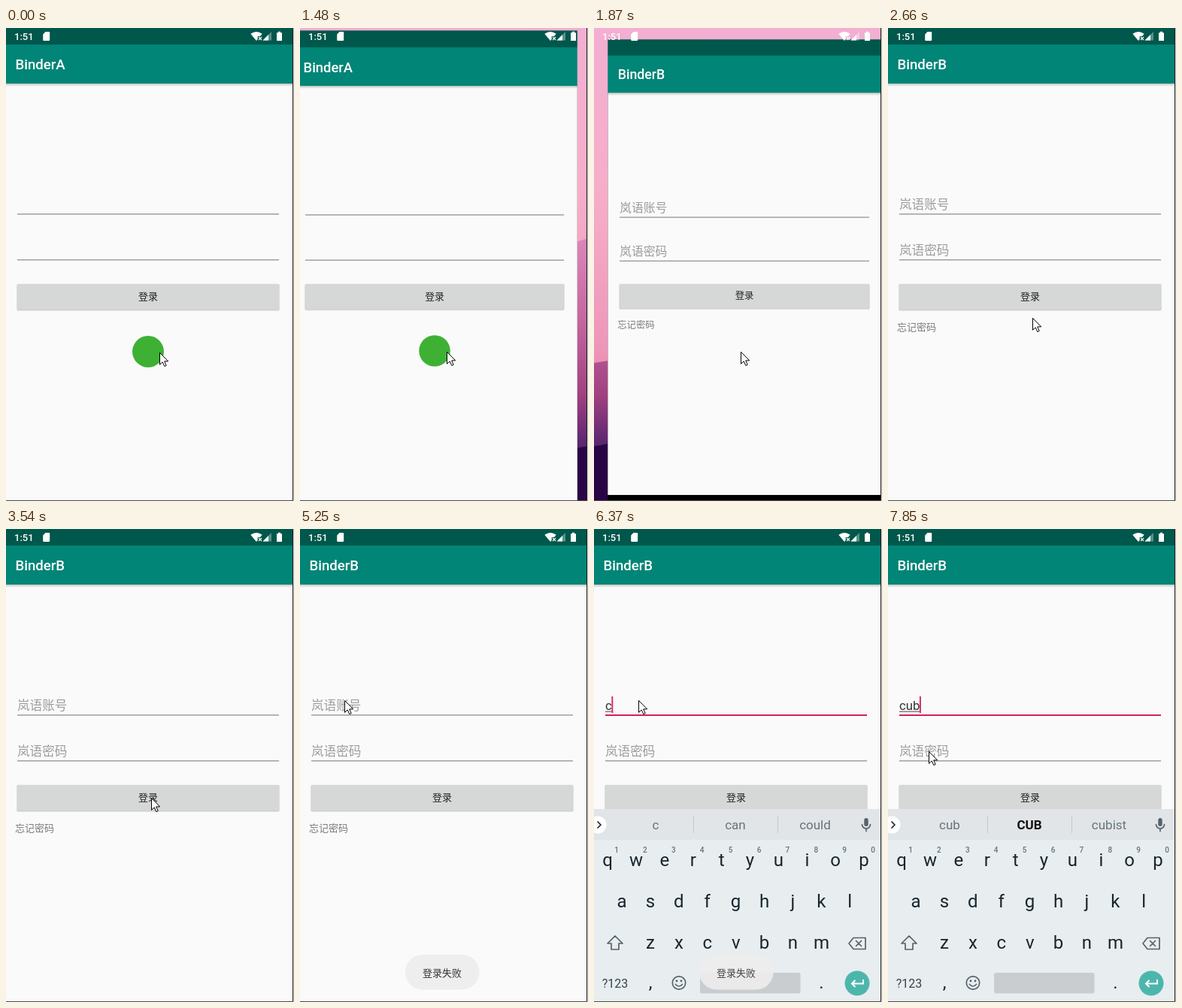
These frames come from a looping animation (383 px wide and 630 px high, 8000 ms). An HTML page:

```html
<!DOCTYPE html>
<html lang="zh">
<head>
<meta charset="utf-8">
<title>Login</title>
<style>
html, body { margin: 0; width: 100%; height: 100%; overflow: hidden; background: #fafafa; }
svg { display: block; width: 100vw; height: 100vh; }
text { font-family: Roboto, "Noto Sans CJK SC", "Noto Sans CJK", sans-serif; }
.mid { text-anchor: middle; }
.key { font-size: 24px; fill: #17262d; text-anchor: middle; }
.num { font-size: 10px; font-weight: 500; fill: #66747a; text-anchor: middle; }
.hint { font-size: 16.6px; fill: #9c9c9c; }
.line { fill: none; stroke: #55636a; stroke-width: 1.7; stroke-linejoin: round; stroke-linecap: round; }
</style>
</head>
<body>
<svg viewBox="0 0 383 630" preserveAspectRatio="none">
  <defs>
    <linearGradient id="sky" x2="0" y2="1">
      <stop offset="0" stop-color="#f3aed2"/>
      <stop offset=".35" stop-color="#f6aec8"/>
      <stop offset=".68" stop-color="#ee96b8"/>
      <stop offset="1" stop-color="#c0508c"/>
    </linearGradient>
    <linearGradient id="hill" gradientUnits="userSpaceOnUse" x1="0" y1="280" x2="0" y2="560">
      <stop offset="0" stop-color="#dc86b9"/>
      <stop offset=".4" stop-color="#c4659f"/>
      <stop offset=".75" stop-color="#a04080"/>
      <stop offset="1" stop-color="#54246f"/>
    </linearGradient>
    <linearGradient id="drop" x2="0" y2="1">
      <stop offset="0" stop-color="#000" stop-opacity=".22"/>
      <stop offset="1" stop-color="#000" stop-opacity="0"/>
    </linearGradient>
    <clipPath id="btnClip"><rect x="15" y="341" width="348" height="34" rx="2"/></clipPath>
    <g id="window">
      <rect x="-1.5" y="-.5" width="382.5" height="700" fill="#000"/>
      <rect x="-1.5" y="-.5" width="382.5" height="636" fill="#fafafa"/>
      <rect x="-1.5" y="-.5" width="382.5" height="23" fill="#00574b"/>
      <rect x="-1.5" y="22" width="382.5" height="52" fill="#008577"/>
      <rect x="-1.5" y="74" width="382.5" height="4" fill="url(#drop)"/>
      <rect x="15" y="247.2" width="348" height="1.3" fill="#929292"/>
      <rect x="15" y="308.2" width="348" height="1.3" fill="#929292"/>
      <rect x="14" y="340.5" width="350" height="36.5" rx="2.5" fill="#000" opacity=".06"/>
      <rect x="14.5" y="341" width="349" height="35.2" rx="2" fill="#000" opacity=".12"/>
      <rect x="15" y="341" width="348" height="34" rx="2" fill="#d6d7d7"/>
      <text class="mid" x="189" y="362.3" font-size="13" fill="#222">登录</text>
    </g>
  </defs>

  <g id="wall">
    <rect width="383" height="630" fill="url(#sky)"/>
    <path d="M0 446 Q120 430 200 370 T383 280 V630 H0Z" fill="url(#hill)"/>
    <path d="M0 557 Q10 556 24 552 Q190 590 383 557 V630 H0Z" fill="#290546"/>
  </g>

  <g id="appA">
    <use href="#window"/>
    <text x="12.5" y="55.3" font-size="18.6" font-weight="500" fill="#fff">BinderA</text>
    <circle cx="189" cy="431" r="21" fill="#3eb134"/>
  </g>

  <g id="appB">
    <use href="#window"/>
    <text x="12.5" y="55.3" font-size="18.6" font-weight="500" fill="#fff">BinderB</text>
    <g clip-path="url(#btnClip)">
      <circle id="ripple" cx="193" cy="358"/>
    </g>
    <text id="hint" class="hint" x="15" y="240.8">岚语账号</text>
    <text class="hint" x="15" y="301.6">岚语密码</text>
    <text x="12" y="402.8" font-size="13" fill="#7b7b7b">忘记密码</text>
    <rect id="focus" y="247" height="2" fill="#d81b60"/>
    <text id="typed" x="15" y="241" font-size="16.7" fill="#333"></text>
    <rect id="compose" x="15" y="242.6" height="1" fill="#444"/>
    <rect id="caret" y="223" width="1.8" height="22" fill="#d81b60"/>
  </g>

  <g id="keyboard">
    <rect y="373" width="381" height="257" fill="#e8edf0"/>
    <rect y="373" width="381" height="41" fill="#e1e5e8"/>
    <circle cx="5" cy="394" r="11.5" fill="#fff"/>
    <path class="line" d="M5 390l4 4-4 4" style="stroke:#222"/>
    <g fill="#55636a">
      <rect x="359.3" y="385" width="5.4" height="11" rx="2.7"/>
      <path class="line" d="M356.5 393.5a5.5 5.5 0 0 0 11 0M362 399v3.5"/>
    </g>
    <g id="strip">
      <path d="M132.5 382v23M244.5 382v23" stroke="#c3c9cc"/>
    </g>
    <g id="keys"></g>
    <path class="line" d="M28 542l-10 10h5v8h10v-8h5z"/>
    <path class="line" d="M345 544.5h16v15h-16l-6-7.5zM348.5 548.5l7 7m0-7l-7 7"/>
    <text class="mid" x="28" y="610.5" font-size="16" fill="#37454b">?123</text>
    <circle class="line" cx="113" cy="604.5" r="8.7"/>
    <path class="line" d="M108.5 606.5q4.5 5 9 0"/>
    <circle cx="110" cy="602" r="1.4" fill="#55636a"/>
    <circle cx="116" cy="602" r="1.4" fill="#55636a"/>
    <rect x="141" y="591" width="133.5" height="27.5" rx="2.5" fill="#c9cdd0"/>
    <circle cx="350" cy="605" r="16.5" fill="#4db6ac"/>
    <path d="M358 600v5.5h-15m4.5-4.5l-4.5 4.5 4.5 4.5" fill="none" stroke="#fff" stroke-width="2"/>
  </g>

  <g id="toast">
    <rect x="140" y="567" width="98.5" height="46.5" rx="23" fill="#eeeeee"/>
    <text class="mid" x="189" y="595.6" font-size="13" fill="#333">登录失败</text>
  </g>

  <g fill="#fff">
    <text x="11" y="16" font-size="13" font-weight="500">1:51</text>
    <path d="M52.5 5H57q1.2 0 1.2 1.2v9.6q0 1.2-1.2 1.2h-6.6q-1.2 0-1.2-1.2V8.5z"/>
    <path d="M325.3 7.7Q333 2.4 340.7 7.7L338 11h-3.3v4l-1.7 2z"/>
    <path d="M336 12l4 4m0-4l-4 4" stroke="#fff" stroke-width="1.2"/>
    <path d="M341.5 16.5L353 5v11.5z" opacity=".35"/>
    <path d="M341.5 16.5L349 9v7.5z"/>
    <path d="M360 6.2h2V4.8h3v1.4h2V17h-7z"/>
  </g>

  <path id="mouse" d="M.5.5V16.3L4.2 12.9 6.8 18.6 9.2 17.5 6.7 11.9H11.7Z" fill="#fff" stroke="#000" stroke-linejoin="round"/>
  <rect x="381" width="1" height="630" fill="#1c1c1c"/>
  <rect x="382" width="1" height="630" fill="#d8d8d8"/>
  <rect y="629" width="382" height="1" fill="#4a4a4a"/>
</svg>
<script>
const LOOP = 8000;
const $ = id => document.getElementById(id);
const set = (id, attrs) => { for (const k in attrs) $(id).setAttribute(k, attrs[k]); };
const show = (id, on) => set(id, { display: on ? "inline" : "none" });

function label(parent, cls, x, y, str) {
  const el = document.createElementNS("http://www.w3.org/2000/svg", "text");
  el.setAttribute("class", cls);
  el.setAttribute("x", x);
  el.setAttribute("y", y);
  el.textContent = str;
  $(parent).append(el);
  return el;
}

function row(chars, x, y) {
  [...chars].forEach((c, i) => label("keys", "key", x + i * 37.9, y, c));
}
row("qwertyuiop", 18, 449);
row("asdfghjkl", 37, 504);
row("zxcvbnm", 75, 559);
row(",", 75, 612);
row(".", 302.5, 612);
[..."1234567890"].forEach((c, i) => label("keys", "num", 30 + i * 37.9, 431, c));

const words = [82, 188, 294].map(x => {
  const el = label("strip", "mid", x, 400, "");
  el.setAttribute("font-size", 17);
  el.setAttribute("fill", "#66747a");
  return el;
});

// Tracks are [time, ...values]; each value holds until the next entry.
const mouse = [
  [0, 204, 432], [250, 202, 430], [370, 199, 429], [490, 196, 430], [610, 195, 431],
  [2270, 195, 424], [2390, 195, 411], [2510, 194, 399],
  [2660, 192, 386], [2780, 193, 370], [2910, 193, 358],
  [4190, 192, 347], [4350, 177, 319], [4500, 160, 292], [4620, 144, 272], [4750, 134, 257],
  [4890, 112, 246], [5010, 86, 236], [5130, 67, 230], [5250, 59, 228],
  [7070, 57, 290], [7190, 48, 405], [7310, 37, 505], [7430, 31, 556],
  [7580, 60, 361], [7730, 76, 322], [7850, 54, 296]
];
// shift and scale of the leaving and the entering window
const slide = [
  [0, 0, 1, 420, 1], [1480, -10, .9885, 420, .9526], [1600, -250, .9526, 150, .9526],
  [1750, -357, .9526, 43, .9526], [1870, -420, .9526, 11, .954], [1990, -420, 1, 0, 1]
];
const ripple = [[0, 0, 0], [3180, 90, .1], [3300, 190, .14], [3420, 190, .06], [3540, 0, 0]];
const toast = [
  [0, 0], [4500, .3], [4620, .7], [4750, 1], [6370, .9], [6490, .55], [6610, .2], [6760, 0]
];
const focus = [[0, 15, 0], [5400, 20, 160], [5520, 15, 348]];
const caret = [[0, 0], [5400, 1], [5950, 0], [6370, 1], [7070, 0], [7580, 1]];
const keyboard = [[0, 0], [5670, .35], [5820, .9], [5950, 1]];
const typing = [
  [0, "", "", "", ""],
  [6370, "c", "c", "can", "could"],
  [6490, "cu", "cu", "cut", "customer"],
  [6610, "cub", "cub", "CUB", "cubist"]
];

function held(track, t) {
  let now = track[0];
  for (const step of track) if (step[0] <= t) now = step;
  return now.slice(1);
}

function place(id, dx, scale) {
  set(id, { transform: `translate(${190.5 + dx} 341) scale(${scale}) translate(-190.5 -341)` });
}

function draw(t) {
  const [ax, as, bx, bs] = held(slide, t);
  show("wall", t >= 1480 && t < 1990);
  show("appA", ax > -400);
  show("appB", bx < 400);
  place("appA", ax, as);
  place("appB", bx, bs);

  const [r, shade] = held(ripple, t);
  set("ripple", { r, opacity: shade });

  const [fx, fw] = held(focus, t);
  set("focus", { x: fx, width: fw });

  const [str, ...options] = held(typing, t);
  $("typed").textContent = str;
  const width = str ? $("typed").getComputedTextLength() : 0;
  set("compose", { width });
  set("caret", { x: 15 + width - (str ? .3 : 0), opacity: held(caret, t)[0] });
  show("hint", !str);
  show("strip", str !== "");
  options.forEach((w, i) => { words[i].textContent = w; });
  const strong = str.length === 3;
  words[1].setAttribute("fill", strong ? "#111" : "#66747a");
  words[1].setAttribute("font-weight", strong ? 700 : 400);

  set("keyboard", { opacity: held(keyboard, t)[0] });
  set("toast", { opacity: held(toast, t)[0] });
  const [mx, my] = held(mouse, t);
  set("mouse", { transform: `translate(${mx} ${my})` });
}

const start = performance.now();
function tick() {
  draw((performance.now() - start) % LOOP);
  requestAnimationFrame(tick);
}
tick();
</script>
</body>
</html>
```
